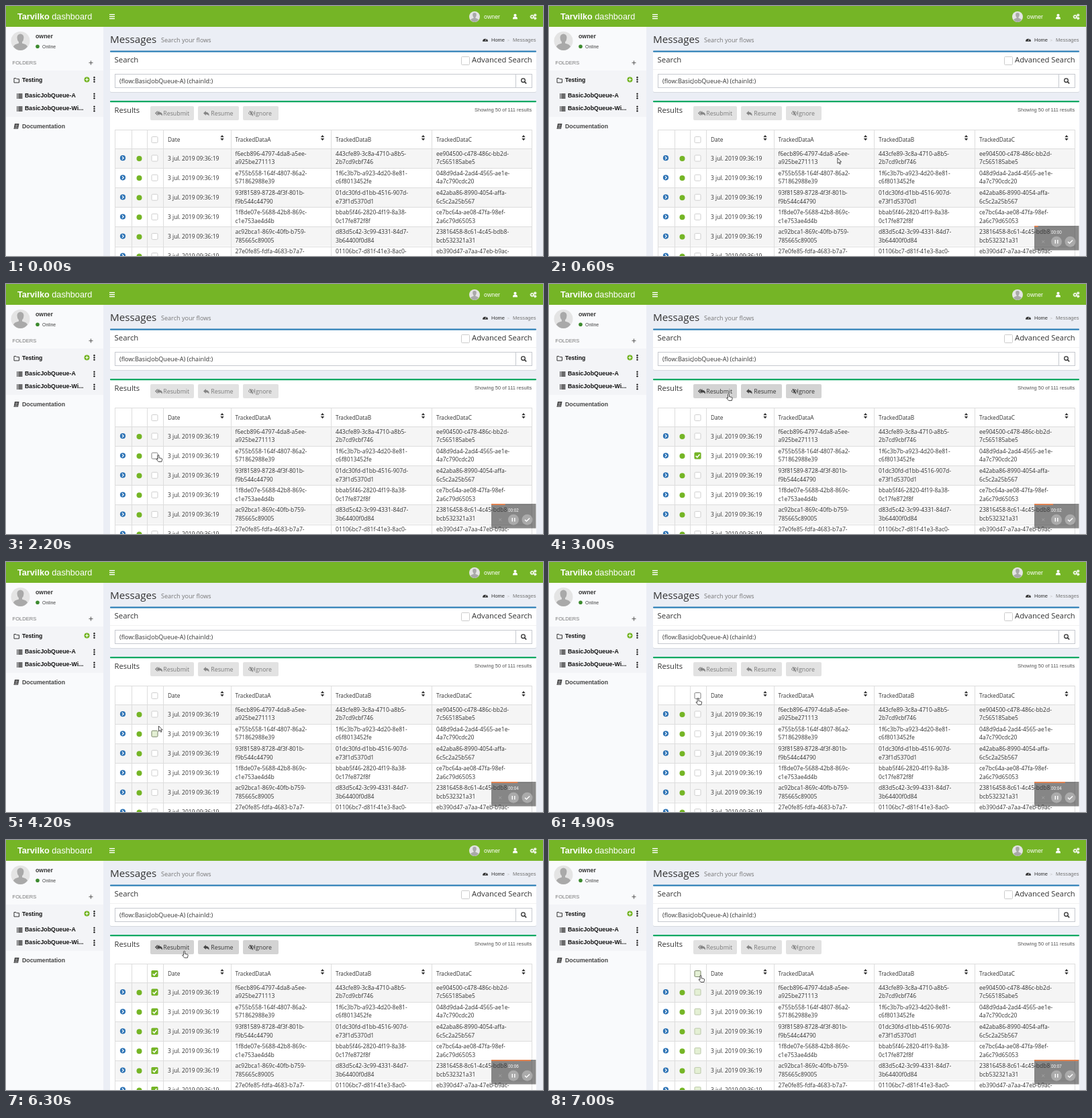
Recreate the animation shown at these times as an HTML page. Size 800 by 372 pixels, loop 7.1 s.

```html
<!DOCTYPE html>
<html lang="en">
<head>
<meta charset="utf-8">
<title>Dashboard messages</title>
<style>
  html, body { margin: 0; height: 100%; overflow: hidden; background: #ebeef5; }
  svg { display: block; width: 100vw; height: 100vh; }
  text { font-family: "Open Sans", "Noto Sans", sans-serif; white-space: pre; }
  .arial { font-family: "Liberation Sans", Arial, sans-serif; }
  .bold { font-family: "Liberation Sans", Arial, sans-serif; font-weight: 700; }
</style>
</head>
<body>
<svg id="stage" viewBox="0 0 800 372"></svg>
<script>
const LOOP = 7100, GREEN = '#75b526', INK = '#333';
const stage = document.getElementById('stage');

// Markup helpers
const rect = (x, y, w, h, fill, more = '') =>
  `<rect x="${x}" y="${y}" width="${w}" height="${h}" fill="${fill}" ${more}/>`;
const circle = (x, y, r, fill, more = '') =>
  `<circle cx="${x}" cy="${y}" r="${r}" fill="${fill}" ${more}/>`;
const text = (x, y, str, size, fill = INK, cls = '', more = '') =>
  `<text x="${x}" y="${y}" font-size="${size}" fill="${fill}" class="${cls}" ${more}>${str}</text>`;
const path = (d, fill, more = '') => `<path d="${d}" fill="${fill}" ${more}/>`;
const line = (d, color, width = 1, more = '') =>
  path(d, 'none', `stroke="${color}" stroke-width="${width}" ${more}`);
const at = (x, y, body, more = '') => `<g transform="translate(${x} ${y})" ${more}>${body}</g>`;

const avatar = (x, y, r) => at(x, y,
  circle(0, 0, 14, '#e4e4e4') +
  path('M-5-5a5 5.5 0 0 1 10 0q0 4-2.5 6.5v2q7 1.500 8 5Q6 14 0 14T-10.500 8.500q1-3.500 8-5v-2Q-5-1-5-5Z', '#a9a9a9'),
).replace(')"', `) scale(${r / 14})"`);
const dots = y => [-3.3, 0, 3.3].map(d => circle(131.5, y + d, 1.2, '#222')).join('');
const listIcon = y => [-3, -1, 1, 3].map(d =>
  rect(16, y + d - .6, 1.4, 1.3, '#222') + rect(18.2, y + d - .6, 6.3, 1.3, '#222')).join('');
const gear = (x, y, r) => circle(x, y, r, 'none', 'stroke="#fff" stroke-width="1.4"') +
  circle(x, y, r + 1, 'none', `stroke="#fff" stroke-width="1" stroke-dasharray="${(r + 1) * Math.PI / 8}"`);
const sorter = x => path(`M${x - 2.7} 195.200h5.400l-2.700-3.200ZM${x - 2.7} 197h5.400l-2.700 3.200Z`, INK);
const checkbox = (x, y, size) => at(x, y,
  rect(.5, .5, size - 1, size - 1, '#fff', 'class="edge" rx="1.5"') +
  rect(0, 0, size, size, GREEN, 'class="fill" rx="1.5"') +
  line('M2.200 5.200L4.300 7.300L8 2.900', '#fff', 1.6, 'class="tick"'), 'class="box"');

const replyArrow = 'M0 3.500L3.800 0V2Q9 2 8.500 7.500Q7 5 3.800 5V7Z';
const icons = {
  Resubmit: path(replyArrow, '#444', 'transform="translate(1.500 0)"') + line('M3 .5L-.3 3.500L3 6.500', '#444', 1.1),
  Resume: path(replyArrow, '#444'),
  Ignore: line('M0 3.500Q4.500-1.500 9 3.500Q4.500 8.500 0 3.500Z', '#444') + circle(4.5, 3.5, 1.6, '#444') + line('M2 0L7 7.500', '#444', 1.1),
};
const button = (x, w, label) => at(x, 149,
  rect(0, 0, w, 21, '#d3d3d3', 'rx="2"') + at(8, 7, icons[label]) +
  text(label === 'Ignore' ? 16.5 : 19.3, 14, label, 8.8), 'class="button"');

const rows = [
  'f6ecb896-4797-4da8-a5ee- a925be271113 443cfe89-3c8a-4710-a8b5- 2b7cd9cbf746 ee904500-c478-486c-bb2d- 7c565185abe5',
  'e755b558-164f-4807-86a2- 571862988e39 1f6c3b7b-a923-4d20-8e81- c6f8013452fe 048d9da4-2ad4-4565-ae1e- 4a7c790cdc20',
  '93f81589-8728-4f3f-801b- f9b544c44790 01dc30fd-d1bb-4516-907d- e73f1d5370d1 e42aba86-8990-4054-affa- 6c5c2a25b567',
  '1f8de07e-5688-42b8-869c- c1e753ae4d4b bbab5f46-2820-4f19-8a38- 0c17fe872f8f ce7bc64a-ae08-47fa-98ef- 2a6c79d65053',
  'ac92bca1-869c-40fb-b759- 785665c89005 d83d5c42-3c99-4331-84d7- 3b64400f0d84 23816458-8c61-4c45-bdb8- bcb532321a31',
  '27e0fe85-fdfa-4683-b7a7- - 01106bc7-d81f-41e3-8ac0- - eb390d47-a7aa-47eb-b9ac- -',
];
const columns = [341.5, 491, 641];

function tableRow(row, i) {
  const y = 212 + i * 29.1, mid = y + 14.5;
  const cells = row.split(' ').map((s, k) =>
    text(columns[k >> 1], y + 10.7 + (k % 2) * 12.6, s, 8.55)).join('');
  return rect(162, y, 622, 29, i % 2 ? '#fff' : '#f5f5f5') + rect(162, Math.round(y), 622, 1, '#ddd') +
    circle(174, mid - .3, 4.1, '#2f74b5') + line(`M173 ${mid - 2.5}l2.200 2.200l-2.200 2.200`, '#fff', 1.2) +
    circle(198.5, mid + .5, 4, GREEN) + checkbox(216.5, mid - 5, 10) +
    text(241, mid + 3.2, '3 jul. 2019 09:36:19', 8.5) + cells;
}

const header =
  rect(0, 0, 800, 31, GREEN) +
  text(17, 20, 'Tarvilko', 12.7, '#fff', 'bold') + text(68.3, 20, 'dashboard', 12.7, '#fff', 'arial') +
  [12, 15, 18].map(y => rect(154, y, 8, 1.4, '#fff')).join('') +
  avatar(698, 16, 8) + text(712, 19, 'owner', 8.8, '#fff', 'arial') +
  circle(758.5, 13.8, 2.1, '#fff') + path('M755 19.500q0-3.500 2-3.500h3q2 0 2 3.500Z', '#fff') +
  gear(783.8, 16, 1.9) + gear(788.3, 13.5, .9) + gear(788.3, 18.3, .9);

const sidebar =
  rect(0, 31, 145, 341, '#f9fafc') + rect(0, 96, 145, 69, '#f3f4f7') +
  avatar(21.500, 52, 14) + text(44, 48, 'owner', 8.8, INK, 'bold') +
  circle(47, 60.2, 2.8, '#3c8a2e') + text(54, 63, 'Online', 7, '#444', 'arial') +
  text(9.5, 86.500, 'FOLDERS', 7.6, '#777', 'arial') + line('M123.500 84.500h6M126.500 81.500v6', '#666', 1.2) +
  line('M12 107.500h3l1 1.200h3.500v5.300h-7.500Z', INK) + text(24, 113, 'Testing', 8.7, '#111', 'bold') +
  circle(120.500, 109.500, 4, GREEN) + line('M118.300 109.500h4.400M120.500 107.300v4.400', '#fff', 1.2) + dots(109.5) +
  listIcon(134) + text(28, 136, 'BasicJobQueue-A', 8.8, '#111', 'bold') + dots(134) +
  listIcon(153) + text(28, 155, 'BasicJobQueue-Wi...', 8.8, '#111', 'bold') + dots(153) +
  path('M13 175h6.500l-1.500 8h-6.500Z', '#444') + line('M14.200 177.200h3.300M13.800 179.200h3.300M12.500 181.700h5', '#f9fafc', .7) +
  text(24, 182, 'Documentation', 8.8, '#444', 'bold');

const search =
  text(155, 54.500, 'Messages', 15.2) + text(231, 54, 'Search your flows', 9.08, '#777') +
  path('M710 52.800a4 4 0 1 1 8 0Z', INK) + line('M714 52l1.500-3', '#ebeef5', .8) +
  text(723, 53, 'Home', 7.5, INK, 'arial') + text(746.5, 52.5, '&gt;', 6, '#bbb', 'arial') +
  text(755, 53, 'Messages', 7.6, '#777', 'arial') +
  rect(155, 68, 635, 61, '#d5d9df', 'rx="2"') + rect(155, 67, 635, 61, '#fff', 'rx="2"') +
  rect(155, 66.5, 635, 2.3, '#2f80b7', 'rx="1"') + rect(155, 94, 635, 1, '#f1f1f1') +
  text(161.5, 84, 'Search', 11.4) + rect(678.5, 75.5, 12, 12, '#fff', 'stroke="#ccc" rx="1"') +
  text(694, 84, 'Advanced Search', 11.27) +
  rect(162.5, 101.5, 621, 20, '#fff', 'stroke="#c6c9cf"') + rect(759, 101, 1, 21, '#c6c9cf') +
  text(169, 114.700, '(flow:BasicJobQueue-A) (chainId:)', 9.1) +
  circle(770.5, 110.700, 2.8, 'none', `stroke="${INK}" stroke-width="1.3"`) + line('M772.500 112.700l2.700 2.700', INK, 1.6);

const results =
  rect(155, 142, 635, 230, '#fff') + rect(155, 141, 635, 2.3, '#00a862', 'rx="1"') +
  text(161.5, 158.700, 'Results', 11.2) +
  button(215, 65, 'Resubmit') + button(286, 61, 'Resume') + button(353, 53, 'Ignore') +
  text(698, 157, 'Showing 50 of 111 results', 7.5, '#555', 'arial') +
  rect(162, 184, 622, 1, '#ddd') + checkbox(216.5, 194, 10) +
  text(241, 201.700, 'Date', 8.4) +
  ['A', 'B', 'C'].map((c, i) => text(columns[i], 201.700, 'TrackedData' + c, 8.25)).join('') +
  [322, 471.5, 621.5, 771].map(sorter).join('') +
  rows.map(tableRow).join('') +
  [162, 187, 210, 234, 335, 484, 634, 783].map(x => rect(x, 184, 1, 188, '#ddd')).join('');

const recorder = `<g id="recorder">` +
  rect(723, 327, 66.500, 36.500, '#3c3c3c', 'opacity=".6"') + rect(723, 327, 0, 2, '#e08150', 'id="progress"') +
  text(756, 338.500, '', 6.3, '#fff', 'arial', 'id="timer" text-anchor="middle"') +
  line('M734.300 348.800l3.800 3.800m0-3.800l-3.800 3.800', '#a2a2a2', 1) +
  circle(756, 350.700, 8, '#fff', 'opacity=".3"') + circle(776.500, 350.700, 8, '#fff', 'opacity=".3"') +
  line('M754.300 348v5.500M757.800 348v5.500', '#fff', 1.4) + line('M773 350.700l2.400 2.400l4.700-4.700', '#fff', 1.4) + `</g>`;

const outline = 'stroke="#222" stroke-width=".8" stroke-linejoin="round"';
const cursor = `<g id="cursor">` +
  path('M0 0V8L1.900 6.300L3.200 9.200L4.500 8.600L3.200 5.800H5.700Z', '#fff', outline + ' class="arrow"') +
  path('M-1 .6Q0-.7 1 .6V4.200L4.800 5Q5.800 5.300 5.600 6.500L4.800 10H.2L-3 6.300Q-2.800 5-1 6.300Z', '#fff', outline + ' class="hand"') +
  `<g class="denied">` + circle(0, 0, 3.3, '#fff', 'stroke="#7d2222" stroke-width="1.5"') +
  line('M-2.300-2.300L2.300 2.300', '#7d2222', 1.5) + `</g></g>`;

stage.innerHTML = rect(0, 0, 800, 372, '#ebeef5') + header + sidebar + search + results + recorder + cursor;

const $ = sel => stage.querySelector(sel);
const boxes = [...stage.querySelectorAll('.box')].map(b => ['edge', 'fill', 'tick'].map(c => b.querySelector('.' + c)));
const buttons = stage.querySelectorAll('.button');

// Pointer stops: time, x, y
const stops = [
  [100, 776, 352], [900, 271, 168.5], [1500, 271, 168.5], [2050, 227, 254.5], [2450, 227, 254.5],
  [2850, 267.5, 163.5], [3250, 267.5, 163.5], [3800, 225, 255], [4050, 225, 255], [4200, 227.5, 244],
  [4700, 222, 202.5], [5550, 222, 202.5], [6000, 268, 163], [6250, 268, 163], [6600, 226, 201.5], [LOOP, 226, 201.5],
];
const ONE = [2400, 4000], ALL = [5050, 6800], FADE = 250;

function pointer(t) {
  const i = Math.max(1, stops.findIndex(s => s[0] > t));
  const [t0, x0, y0] = stops[i - 1], [t1, x1, y1] = stops[i];
  const u = Math.max(0, (t - t0) / (t1 - t0)), e = u * u * (3 - 2 * u);
  return [x0 + (x1 - x0) * e, y0 + (y1 - y0) * e];
}
const clamp = v => Math.min(1, Math.max(0, v));
const within = (t, [a, b]) => t >= a && t < b;
const checked = (t, [a, b]) => clamp((t - a) / 120) * (t < b ? 1 : clamp(1 - (t - b) / FADE));

function draw(t) {
  const [x, y] = pointer(t);
  const enabled = within(t, ONE) || within(t, ALL);
  const overButton = y > 149 && y < 170 && x > 215 && x < 406;
  const over = cy => Math.abs(x - 221.5) < 6.5 && Math.abs(y - cy) < 6.5;
  const hover = over(199) ? 0 : over(255.6) ? 2 : -1;

  boxes.forEach(([edge, fill, tick], i) => {
    const on = Math.max(checked(t, ALL), i === 2 ? checked(t, ONE) : 0);
    edge.setAttribute('stroke', i === hover || (i === 2 && within(t, [4000, 4300])) ? '#808080' : '#cfcfcf');
    fill.setAttribute('opacity', on);
    tick.setAttribute('opacity', on > .5 ? 1 : 0);
  });
  buttons.forEach(b => b.setAttribute('opacity', enabled ? 1 : .65));

  const shape = overButton ? (enabled ? 'hand' : 'denied') : hover < 0 ? 'arrow' : 'hand';
  for (const kind of ['arrow', 'hand', 'denied'])
    $('#cursor .' + kind).style.display = kind === shape ? '' : 'none';
  $('#cursor').setAttribute('transform', `translate(${x} ${y})`);
  $('#cursor').style.display = $('#recorder').style.display = t < 100 ? 'none' : '';

  $('#progress').setAttribute('width', 66.5 * t / LOOP);
  $('#timer').textContent = '00:0' + Math.max(0, Math.floor((t * 1.02 - 80) / 1000));
}

const start = performance.now();
function tick() {
  draw((performance.now() - start) % LOOP);
  requestAnimationFrame(tick);
}
tick();
</script>
</body>
</html>
```
